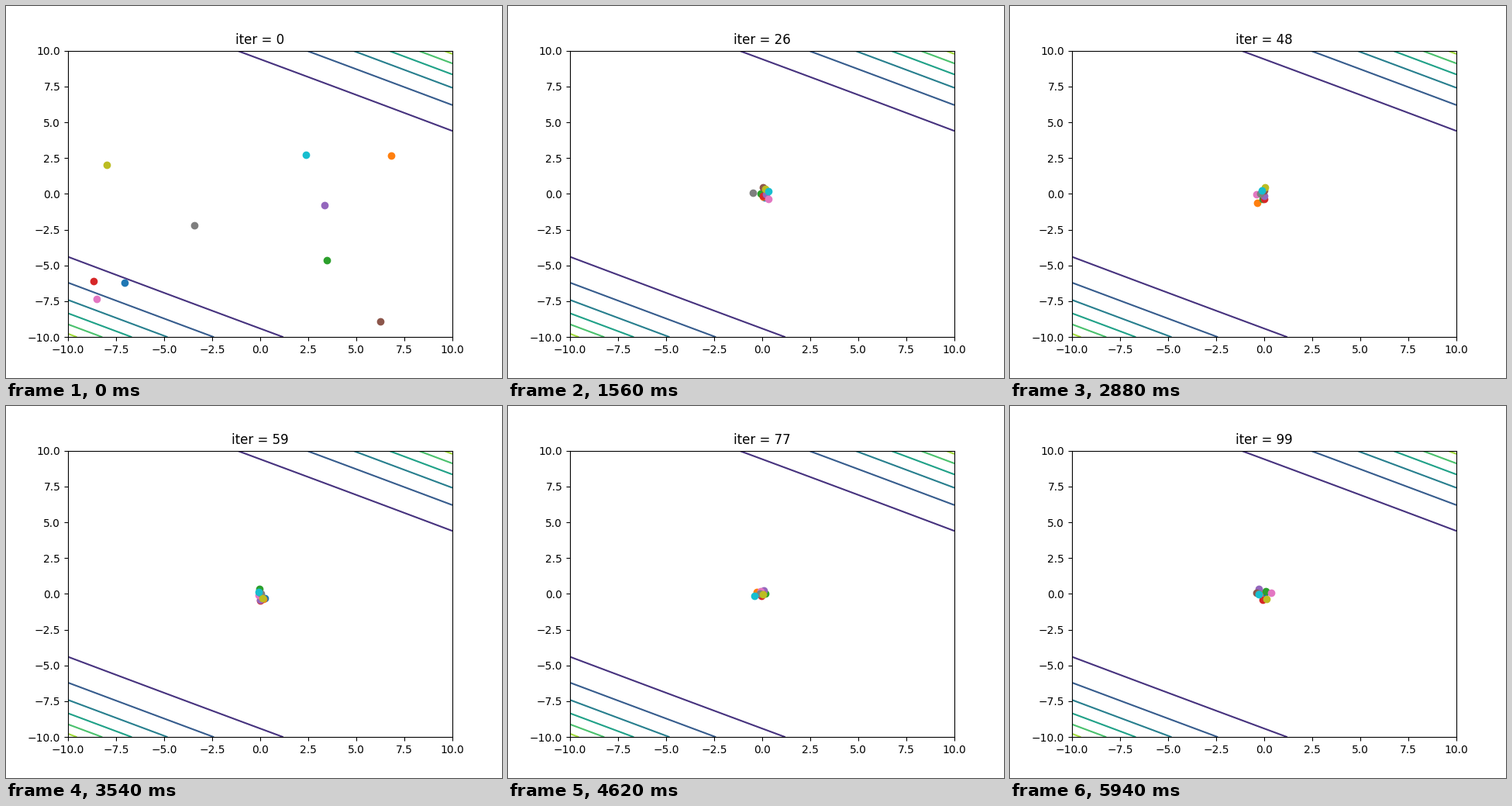
A matplotlib script for the animation above (6000 ms loop, 640x480 px).

```python
import numpy as np
import matplotlib.pyplot as plt
from matplotlib.animation import FuncAnimation

STEPS = 100
LIMIT = 10
V_MAX = 0.5
INERTIA, PULL = 0.9, 2.0

START = np.array([
    (-7.05, -6.19), (6.83, 2.66), (3.47, -4.63), (-8.67, -6.1), (3.35, -0.8),
    (6.25, -8.91), (-8.5, -7.35), (-3.43, -2.2), (-7.98, 2.02), (2.38, 2.72)])


def zakharov(x, y):
    u = 0.5 * x + y
    return x**2 + y**2 + u**2 + u**4


def swarm():
    """Particle swarm with clamped velocity, one pose per iteration."""
    rng = np.random.default_rng(3)
    pos, vel = START.copy(), np.zeros_like(START)
    best = pos.copy()
    path = [pos]
    for _ in range(STEPS - 1):
        lead = best[np.argmin(zakharov(*best.T))]
        r1, r2 = rng.random((2,) + pos.shape)
        vel = INERTIA * vel + PULL * (r1 * (best - pos) + r2 * (lead - pos))
        vel = np.clip(vel, -V_MAX, V_MAX)
        pos = pos + vel
        better = zakharov(*pos.T) < zakharov(*best.T)
        best[better] = pos[better]
        path.append(pos)
    return path


path = swarm()

fig, ax = plt.subplots(figsize=(6.4, 4.8), dpi=100)
grid = np.linspace(-LIMIT, LIMIT, 100)
X, Y = np.meshgrid(grid, grid)
ax.contour(X, Y, zakharov(X, Y))
dots = [ax.plot([], [], "o", color=f"C{i}")[0] for i in range(len(START))]
ax.set_xlim(-LIMIT, LIMIT)
ax.set_ylim(-LIMIT, LIMIT)
title = ax.set_title("iter = 0")


def update(k):
    for dot, (x, y) in zip(dots, path[k]):
        dot.set_data([x], [y])
    title.set_text(f"iter = {k}")
    return dots + [title]


anim = FuncAnimation(fig, update, frames=STEPS, interval=60, repeat=True,
                     repeat_delay=0, blit=False)
plt.show()
```
